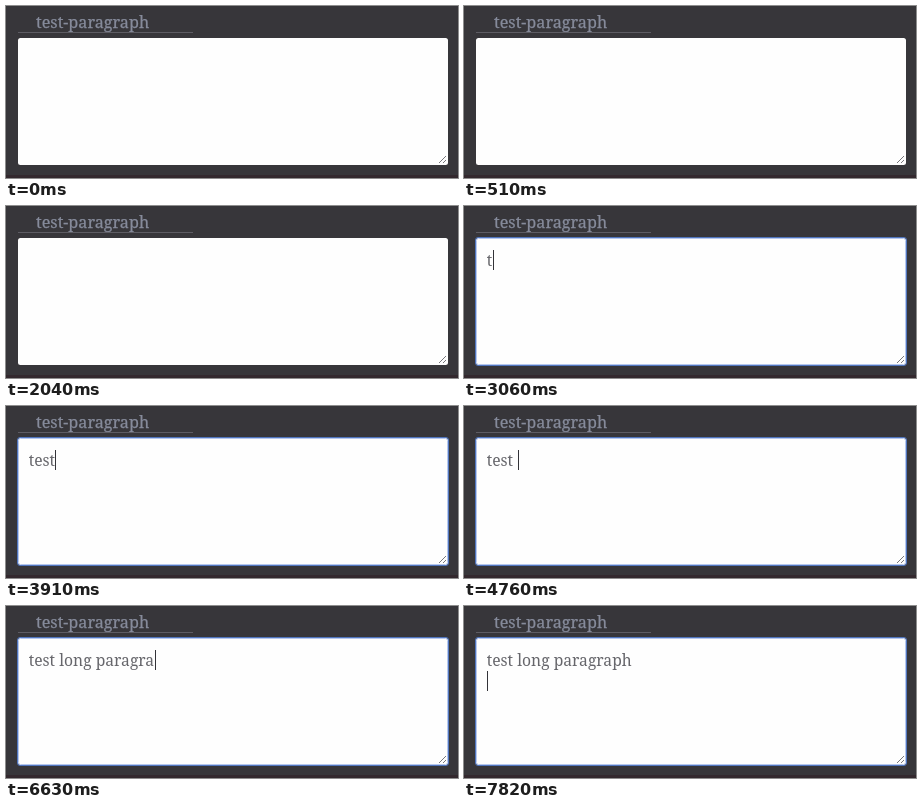
Write an HTML page that moves like this. It is 452x172 px and loops after 7.99 s.

```html
<!DOCTYPE html>
<html lang="en">
<head>
<meta charset="utf-8">
<title>Paragraph field</title>
<style>
  html, body { margin: 0; width: 100%; height: 100%; overflow: hidden; background: #37363a; }
  svg { display: block; width: 100%; height: 100%; }
  text { font-family: "Noto Serif", serif; white-space: pre; }
  .label { font-size: 16.2px; fill: #868b9b; stroke: #868b9b; stroke-width: .25px; }
  .typed { font-size: 15.65px; font-weight: 300; fill: #66666b; }
</style>
</head>
<body>
<svg viewBox="0 0 452 172">
  <rect width="452" height="172" fill="#37363a"/>
  <rect y="169" width="452" height="3" fill="#33292e"/>
  <text class="label" x="30" y="22">test-paragraph</text>
  <rect x="12" y="26" width="175" height="1" fill="#5d5c63"/>
  <rect x="12" y="32" width="430" height="127" rx="2.5" fill="#fefefe"/>
  <g id="ring" fill="none">
    <rect x="12.5" y="32.5" width="429" height="126" rx="2" stroke="#b6c8ee"/>
    <rect x="11.5" y="31.5" width="431" height="128" rx="2.5" stroke="#5075bd"/>
  </g>
  <path d="M433 157l7-7M437 157l3-3" stroke="#77777b" fill="none"/>
  <text id="typed" class="typed" x="22.7" y="60"></text>
  <rect id="caret" y="44" width="1" height="20" fill="#333338"/>
</svg>
<script>
  const LOOP = 7990, FOCUS = 2380, BLINK = 530, LEFT = 23;
  const message = "test long paragraph\n";
  // When each character of the message is typed, in ms
  const keys = [
    2890, 3400, 3570, 3910, 4420,
    4930, 5100, 5270, 5440, 5610,
    5950, 6120, 6290, 6290, 6460, 6460, 6630, 6800, 6970,
    7480
  ];
  const [ring, typed, caret] = ["ring", "typed", "caret"].map(id => document.getElementById(id));
  const show = (el, on) => el.setAttribute("visibility", on ? "visible" : "hidden");

  function draw(t) {
    const count = keys.filter(k => k <= t).length;
    const lines = message.slice(0, count).split("\n");
    const last = count ? keys[count - 1] : FOCUS;
    const focused = t >= FOCUS;

    if (typed.textContent !== lines[0]) typed.textContent = lines[0];
    const width = lines.length > 1 || !count ? 0 : typed.getComputedTextLength();
    caret.setAttribute("x", Math.round(LEFT + width));
    caret.setAttribute("y", 44 + 21 * (lines.length - 1));

    show(ring, focused);
    show(caret, focused && (t - last) % (2 * BLINK) < BLINK);
  }

  const start = performance.now();
  function tick() {
    draw((performance.now() - start) % LOOP);
    requestAnimationFrame(tick);
  }
  tick();
</script>
</body>
</html>
```
